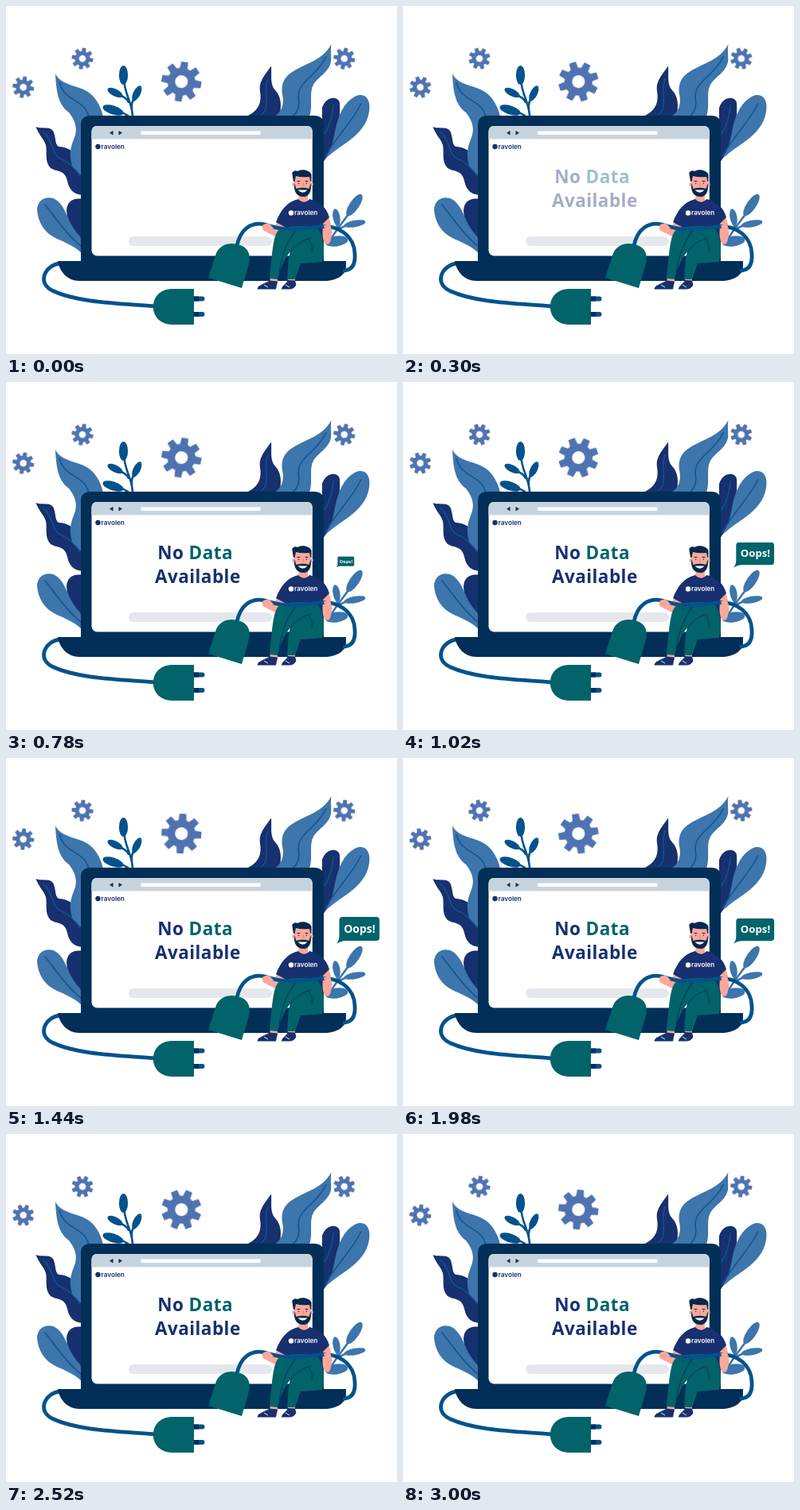
Write an HTML page without scripts that moves like this. It is 491x438 px and loops after 3060 ms.

```html
<!DOCTYPE html>
<html lang="en">
<head>
<meta charset="utf-8">
<title>No Data Available</title>
<style>
html, body { margin: 0; width: 100%; height: 100%; overflow: hidden; background: #fff; }
svg { display: block; width: 491px; height: 438px; }
.blue { fill: #3d75ad; }
.navy { fill: #17306f; }
.deep { fill: #02528c; }
.teal { fill: #02636b; }
.dark { fill: #022f58; }
.skin { fill: #fba79a; }
.vein { fill: none; stroke: #0d5592; stroke-width: 1.5; stroke-linecap: round; }
.stem { fill: none; stroke: #02528c; stroke-width: 2.6; stroke-linecap: round; }
.cable { fill: none; stroke: #02528c; stroke-width: 4.8; stroke-linecap: round; }
.fold { fill: none; stroke: #0a3f5c; stroke-width: 1.2; stroke-linecap: round; }
.gear { fill: #4f73b1; animation: spin 3060ms steps(51) infinite; }
.title { font: 800 22.5px "Noto Sans", "Open Sans", sans-serif; letter-spacing: .45px; text-anchor: middle; animation: fade 3060ms linear infinite; }
.bubble { transform-origin: 415px 233px; animation: pop 3060ms linear infinite; }
.oops { font: 800 14px "Noto Sans", "Open Sans", sans-serif; fill: #fff; text-anchor: middle; }
.brand { font: 600 8.2px Inter, "Open Sans", sans-serif; }
@keyframes spin { from { transform: rotate(9.7deg); } to { transform: rotate(189.7deg); } }
@keyframes fade { 0% { opacity: 0; } 25%, 100% { opacity: 1; } }
/* elastic entrance, mirrored on the way out */
@keyframes pop {
  0%, 23.53% { transform: scale(0); }
  25.49% { transform: scale(.4); }
  27.45% { transform: scale(1.13); }
  29.41% { transform: scale(1.24); }
  31.37% { transform: scale(1.08); }
  33.33% { transform: scale(.945); }
  35.29% { transform: scale(.97); }
  37.25%, 60.78% { transform: scale(1); }
  62.75% { transform: scale(.97); }
  64.71% { transform: scale(.945); }
  66.67% { transform: scale(1.08); }
  68.63% { transform: scale(1.24); }
  70.59% { transform: scale(1.13); }
  72.55% { transform: scale(.4); }
  74.51%, 100% { transform: scale(0); }
}
</style>
</head>
<body>
<svg viewBox="0 0 491 438">
  <defs>
    <path id="tooth" d="M-5-15 L-4.2-25 H4.2 L5-15Z M-5 15 L-4.2 25 H4.2 L5 15Z"/>
    <g id="cog">
      <path fill-rule="evenodd" d="M-17.5 0a17.5 17.5 0 1 0 35 0a17.5 17.5 0 1 0-35 0Z M-8 0a8 8 0 1 0 16 0a8 8 0 1 0-16 0Z"/>
      <use href="#tooth"/>
      <use href="#tooth" transform="rotate(45)"/>
      <use href="#tooth" transform="rotate(90)"/>
      <use href="#tooth" transform="rotate(135)"/>
    </g>
  </defs>

  <!-- gears -->
  <g transform="translate(220.3 95.2)"><use href="#cog" class="gear"/></g>
  <g transform="translate(96 66.2) scale(.54)"><use href="#cog" class="gear"/></g>
  <g transform="translate(21.7 102.2) scale(.54)"><use href="#cog" class="gear"/></g>
  <g transform="translate(424.8 66.2) scale(.54)"><use href="#cog" class="gear"/></g>

  <!-- left plants -->
  <path class="navy" d="M37.500 152C42 155 55 151 59 157C63 164 61 174 66 177C75 177 86 182 96 195V238C84 237 79 230 77 220C74 206 64 209 56 204C48 196 52 184 50 175C48 168 41 162 37.500 152Z"/>
  <path class="vein" d="M46 158C60 168 56 186 68 192Q82 197 93 214"/>
  <path class="blue" d="M62 85C68 99 89 100 101 107C112 113 119 126 122 139L96 146V215L83 201C79 188 81 178 85 168C91 155 87 144 79 134C65 124 63 106 62 85Z"/>
  <path class="vein" d="M67 96C74 122 99 116 104 140"/>
  <path class="navy" d="M96 243C84 241 76 247 76 258C77 276 88 290 96 300Z"/>
  <path class="blue" d="M39 256C40 244 49 239 59 242C71 246 77 265 82 275C87 285 95 290 96 297V312C86 302 73 297 62 292C48 285 40 272 39 256Z"/>
  <path class="vein" d="M49 250C62 266 76 288 95 303"/>
  <g class="deep">
    <ellipse cx="147.500" cy="87" rx="5.600" ry="12"/>
    <ellipse cx="137" cy="109" rx="10.500" ry="4.600" transform="rotate(27 137 109)"/>
    <ellipse cx="134.500" cy="131" rx="13.500" ry="5.600" transform="rotate(18 134.500 131)"/>
    <ellipse cx="164.300" cy="110" rx="4.500" ry="10.500" transform="rotate(26 164.300 110)"/>
    <path class="stem" d="M148 92C149 112 158 120 159 138M142 112Q151 115 154 121M161 116Q157 122 158 130M142 133Q151 136 154 139"/>
  </g>

  <!-- right plants -->
  <path class="navy" d="M333 75.500C324 88 317 96 319 107C321 120 319 131 302 139H343C347 125 345 113 338 106C331 98 334 88 333 75.500Z"/>
  <path class="vein" d="M329 92C322 111 334 124 321 137"/>
  <path class="blue" d="M408.500 48C398 68 379 71 361 82C349 89 345 99 347 111C350 124 346 133 337 139H381C386 126 380 110 386 99C392 89 406 83 408 70C409 63 407 57 408.500 48Z"/>
  <path class="vein" d="M402 64C391 88 367 94 367 114Q370 130 361 138"/>
  <path class="navy" d="M397 198V128C402 113 417 113 419 122C421 146 412 180 397 198Z"/>
  <path class="blue" d="M397 197C412 182 411 161 416 146C421 128 432 114 444 112C454 111 458 121 456 133C451 166 415 175 397 197Z"/>
  <path class="vein" d="M446 123C431 151 418 160 401 189M411 125Q410 145 400 161"/>
  <g class="blue">
    <ellipse cx="437.500" cy="250.500" rx="6" ry="16" transform="rotate(34 437.500 250.500)"/>
    <ellipse cx="415" cy="266" rx="4.500" ry="11" transform="rotate(-10 415 266)"/>
    <ellipse cx="438" cy="274" rx="13.500" ry="4.300" transform="rotate(-10 438 274)"/>
    <ellipse cx="415" cy="296" rx="14.500" ry="6.500" transform="rotate(-8 415 296)"/>
    <path class="stem" style="stroke:#3d75ad" d="M434 256C427 268 416 278 404 300M416 272V281M432 275Q424 277 416 282"/>
  </g>

  <!-- laptop -->
  <path class="cable" d="M68 324C48 326 38 350 60 359C90 373 140 374 188 378"/>
  <path class="dark" d="M94 323V150Q94 138 106 138H387Q399 138 399 150V323Z"/>
  <path class="dark" d="M65 321H427V328C427 339 414 346 400 346H92C77 346 67 334 65 321Z"/>
  <rect x="107.500" y="151" width="277.300" height="163.500" rx="7" fill="#fff"/>
  <path fill="#c8d4dd" d="M107.500 167.500V158Q107.500 151 114.500 151H377.800Q384.800 151 384.800 158V167.500Z"/>
  <rect x="169.500" y="157.500" width="150" height="4.600" fill="#fff"/>
  <path class="dark" d="M134.500 157V162.600L130 159.800ZM141.500 157V162.600L146 159.800Z"/>
  <rect x="154" y="290" width="180" height="12" rx="6" fill="#e4e7eb"/>
  <g class="navy brand">
    <circle cx="115.500" cy="177" r="3.200"/>
    <text x="119.500" y="180">ravolen</text>
  </g>
  <g class="title navy">
    <text x="237.600" y="223">No <tspan class="teal">Data</tspan></text>
    <text x="240.800" y="253">Available</text>
  </g>

  <!-- plug -->
  <path class="teal" d="M236 356H208C177 357 177 400 208 401H236Z"/>
  <path class="deep" d="M236 365.500H246.500Q249.500 365.500 249.500 368.500T246.500 371.500H236ZM236 385H246.500Q249.500 385 249.500 388T246.500 391H236Z"/>
  <path class="dark" d="M236 365.500H242V371.500H236ZM236 385H242V391H236Z"/>

  <!-- sitting man -->
  <path class="skin" d="M332 340H341V350H331ZM354 340H363V350H354ZM368 232H379V246Q373 252 367 245Z"/>
  <path class="skin" d="M341 271L351 277C349 286 344 291 338 290L324 283Q320 280 323 275L336 280Z"/>
  <path class="skin" d="M398 273L405.500 266C410 279 410 291 406 299Q402 301 399 297Q396 286 398 273Z"/>
  <path class="navy" d="M367 243C372 248 377 248 381 243C394 246 403 254 406 266L398 274L397 291H352L350 278L339 272C345 257 352 247 367 243Z"/>
  <path class="teal" d="M346 280C336 283 335 302 331 343L341 344C344 330 350 318 357 309C354 320 354 334 353 344H363L370 324L397 322C401 309 399 289 391 279Q369 274 346 280Z"/>
  <path class="fold" d="M364 283Q349 300 343 335M383 292Q366 296 357 310M379 292Q386 301 384 309"/>
  <path class="navy" d="M315.500 356.500C316 351 324 350 331 345.500L341 346.500L339 356.500ZM346 356.500C346 352 352 350 354 345L363 345.500L364.500 351Q362 356.500 355 356.500Z"/>
  <path stroke="#fff" stroke-width=".9" d="M324 351L329 354M351 351L356 354"/>

  <path class="skin" d="M362 213H383V226Q382 238 372.500 238T362 226Z"/>
  <circle class="skin" cx="361.500" cy="224.500" r="2.300"/>
  <circle class="skin" cx="383.500" cy="224.500" r="2.300"/>
  <path fill="#07284d" d="M361 221L359.500 212C358 208 364 206 366 208C372 204 382 207 383.500 212L383.500 221H382.500L381 215Q371 216 364 214L362.500 221ZM362 223L364.500 230Q373 227.500 380.500 230L383 223C384 236 379 240 373 240S361 236 362 223Z"/>
  <path fill="#fff" d="M366.500 231.500H378.500Q373 238 366.500 231.500Z"/>
  <path fill="none" stroke="#07284d" stroke-linecap="round" d="M366 220.500H369M376 220.500H379M367.700 223V223.500M377.400 223V223.500"/>
  <path fill="none" stroke="#e57c76" d="M373 222L374 226H372"/>
  <g class="brand" fill="#fff">
    <circle cx="358" cy="260.500" r="3.200"/>
    <text x="362" y="263.300">ravolen</text>
  </g>

  <!-- socket and cable -->
  <path class="cable" d="M290 302C294 281 308 271 325 275C350 283 365 282 385 279C421 271 438 294 438 312C439 325 435 332 425 333"/>
  <path class="skin" d="M322 276Q327 272 332 275L336 280Q331 285 325 282ZM399 276L407 274L410 286L403 290Z"/>
  <path class="teal" d="M254 342L264 311C270 298 284 297 294 301C306 305 308 316 304 328L296 355Z"/>

  <!-- speech bubble -->
  <g class="bubble">
    <path class="teal" d="M415 233.500Q419 229 418.500 222V204Q418.500 200 422.500 200H465Q469 200 469 204V226Q469 230 465 230H425Q420 230.500 415 233.500Z"/>
    <text class="oops" x="444" y="219.700">Oops!</text>
  </g>
</svg>
</body>
</html>
```
